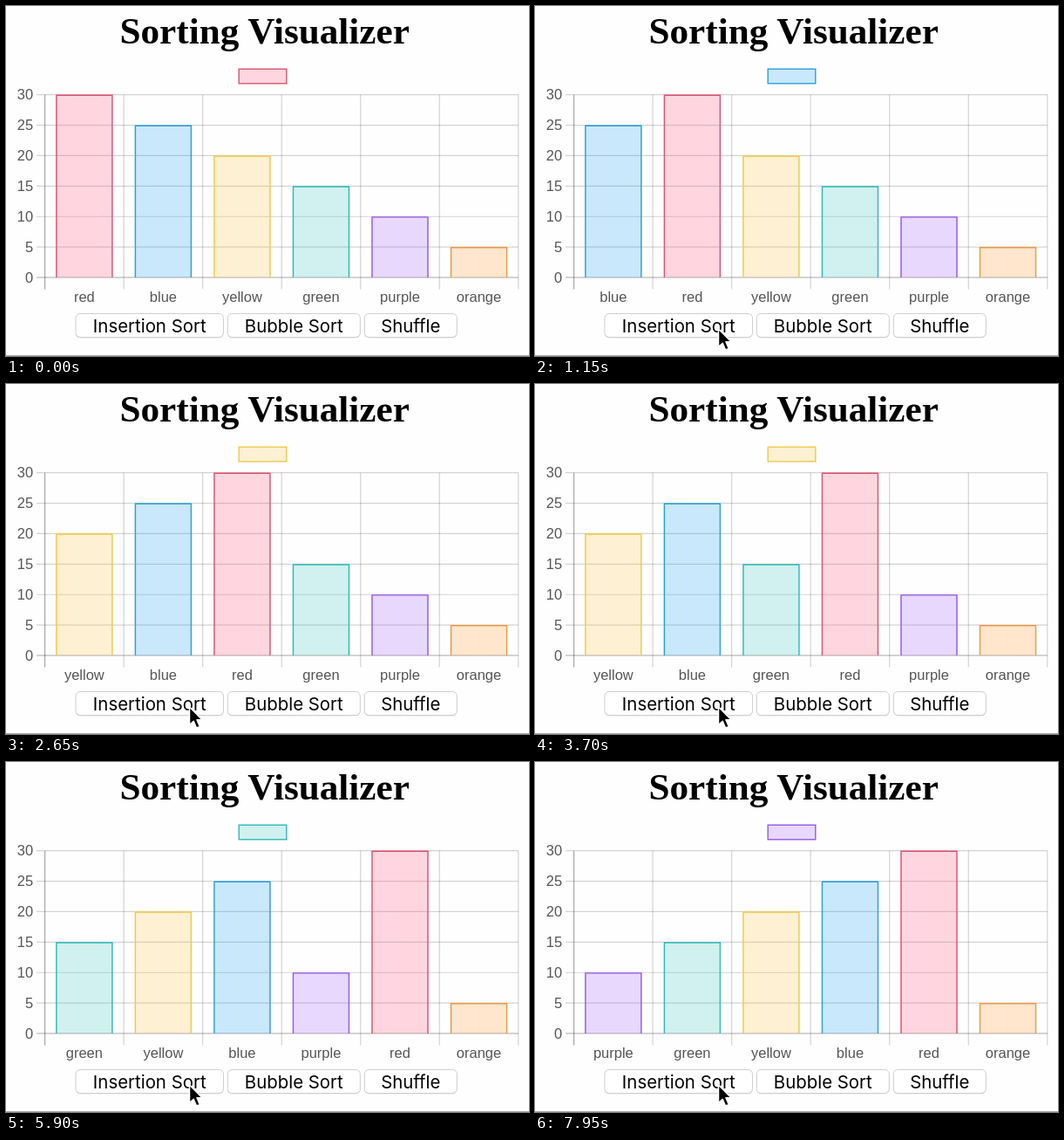
Animation, 600 px wide and 401 px high, one loop 8 s. Source, as an HTML page:

```html
<!DOCTYPE html>
<html lang="en">
<head>
<meta charset="utf-8">
<title>Sorting Visualizer</title>
<style>
  html, body { margin: 0; width: 100%; height: 100%; overflow: hidden; background: #fefefe; }
  svg { display: block; }
  .title { font: bold 43.2px "Liberation Serif", serif; }
  .label { font: 16.5px "Liberation Sans", sans-serif; fill: #555; }
  .button { font: 20.4px Inter, sans-serif; fill: #000; }
  .mid { text-anchor: middle; }
  .end { text-anchor: end; }
</style>
</head>
<body>
<svg id="stage" width="600" height="401" viewBox="0 0 600 401"></svg>
<script>
const LOOP = 8000;
const LEFT = 44.6, RIGHT = 587.8, TOP = 101.7, BASE = 311;
const COL = (RIGHT - LEFT) / 6, BAR = COL * 0.72;

const items = [
  { name: 'red', value: 30, fill: '#ff5b7f', line: '#dc5270' },
  { name: 'blue', value: 25, fill: '#2fa3f3', line: '#2a9fd8' },
  { name: 'yellow', value: 20, fill: '#f7c34f', line: '#efca48' },
  { name: 'green', value: 15, fill: '#43c7bf', line: '#30b9b5' },
  { name: 'purple', value: 10, fill: '#a763fb', line: '#9459e6' },
  { name: 'orange', value: 5, fill: '#ff9b37', line: '#e59a48' }
];

// [time, left slot]: each swaps a slot with its right neighbour
const swaps = [
  [1150, 0], [2150, 1], [2650, 0], [3700, 2], [4200, 1],
  [4700, 0], [5700, 3], [6200, 2], [6700, 1], [7200, 0]
];

const stage = document.getElementById('stage');

function add(tag, attrs, text) {
  const el = document.createElementNS('http://www.w3.org/2000/svg', tag);
  set(el, attrs);
  if (text !== undefined) el.textContent = text;
  return stage.appendChild(el);
}

function set(el, attrs) {
  for (const key in attrs) el.setAttribute(key, attrs[key]);
}

function rule(x1, y1, x2, y2, dark) {
  add('line', { x1, y1, x2, y2, stroke: '#000', 'stroke-opacity': dark ? 0.34 : 0.17, 'stroke-width': 1.2 });
}

const valueY = v => BASE - (BASE - TOP) * v / 30;
const slotX = i => LEFT + COL * (i + 0.5);

add('rect', { width: 600, height: 401, fill: '#fefefe' });
add('text', { x: 130.5, y: 43, class: 'title' }, 'Sorting Visualizer');

for (let v = 0; v <= 30; v += 5) {
  const y = valueY(v);
  rule(35, y, RIGHT, y, v === 0);
  add('text', { x: 31.2, y: y + 5.6, class: 'label end' }, v);
}
for (let i = 0; i <= 6; i++) {
  const x = LEFT + COL * i;
  rule(x, TOP, x, 324.5, i === 0);
}

const legend = add('rect', { x: 267.2, y: 72.2, width: 54.6, height: 16.6, 'fill-opacity': 0.25, 'stroke-width': 1.4 });
const slots = items.map((_, i) => ({
  fill: add('rect', { 'fill-opacity': 0.25 }),
  edge: add('path', { fill: 'none', 'stroke-width': 1.4 }),
  label: add('text', { x: slotX(i), y: 339.2, class: 'label mid' })
}));

function button(x, width, text) {
  const box = { x, width, height: 27, rx: 5 };
  add('rect', { ...box, y: 353.2, fill: '#c4c4c4' });
  add('rect', { ...box, y: 352.5, fill: '#fff', stroke: '#cfcfcf' });
  add('text', { x: x + width / 2, y: 374, class: 'button mid' }, text);
}
button(80, 169.5, 'Insertion Sort');
button(254.3, 152, 'Bubble Sort');
button(411.3, 106, 'Shuffle');

rule(0, 400.5, 600, 400.5, true);

const cursor = add('path', {
  d: 'M0 0V20.5L4.7 16.2L8 24L11.8 22.4L8.5 14.8H14.6Z',
  fill: '#000', stroke: '#fff', 'stroke-width': 1.5, 'stroke-linejoin': 'round'
});

function drawSlot(i, item) {
  const { fill, edge, label } = slots[i];
  const y = valueY(item.value), x = slotX(i) - BAR / 2;
  set(fill, { x, y, width: BAR, height: BASE - y, fill: item.fill });
  set(edge, {
    d: `M${x + 0.6} ${BASE}V${y + 0.6}H${x + BAR - 0.6}V${BASE}`,
    stroke: item.line
  });
  label.textContent = item.name;
}

function render(t) {
  const order = items.slice();
  for (const [time, i] of swaps) {
    if (t >= time - 15) [order[i], order[i + 1]] = [order[i + 1], order[i]];
  }
  order.forEach((item, i) => drawSlot(i, item));
  set(legend, { fill: order[0].fill, stroke: order[0].line });

  const p = Math.min(1, Math.max(0, (t - 35) / 600));
  const rest = (1 - p) ** 2;
  set(cursor, {
    transform: `translate(${210.5 + 24 * rest} ${370 + 34 * rest})`,
    visibility: p > 0 ? 'visible' : 'hidden'
  });
}

const start = performance.now();
function tick() {
  render((performance.now() - start) % LOOP);
  requestAnimationFrame(tick);
}
render(0);
requestAnimationFrame(tick);
</script>
</body>
</html>
```
